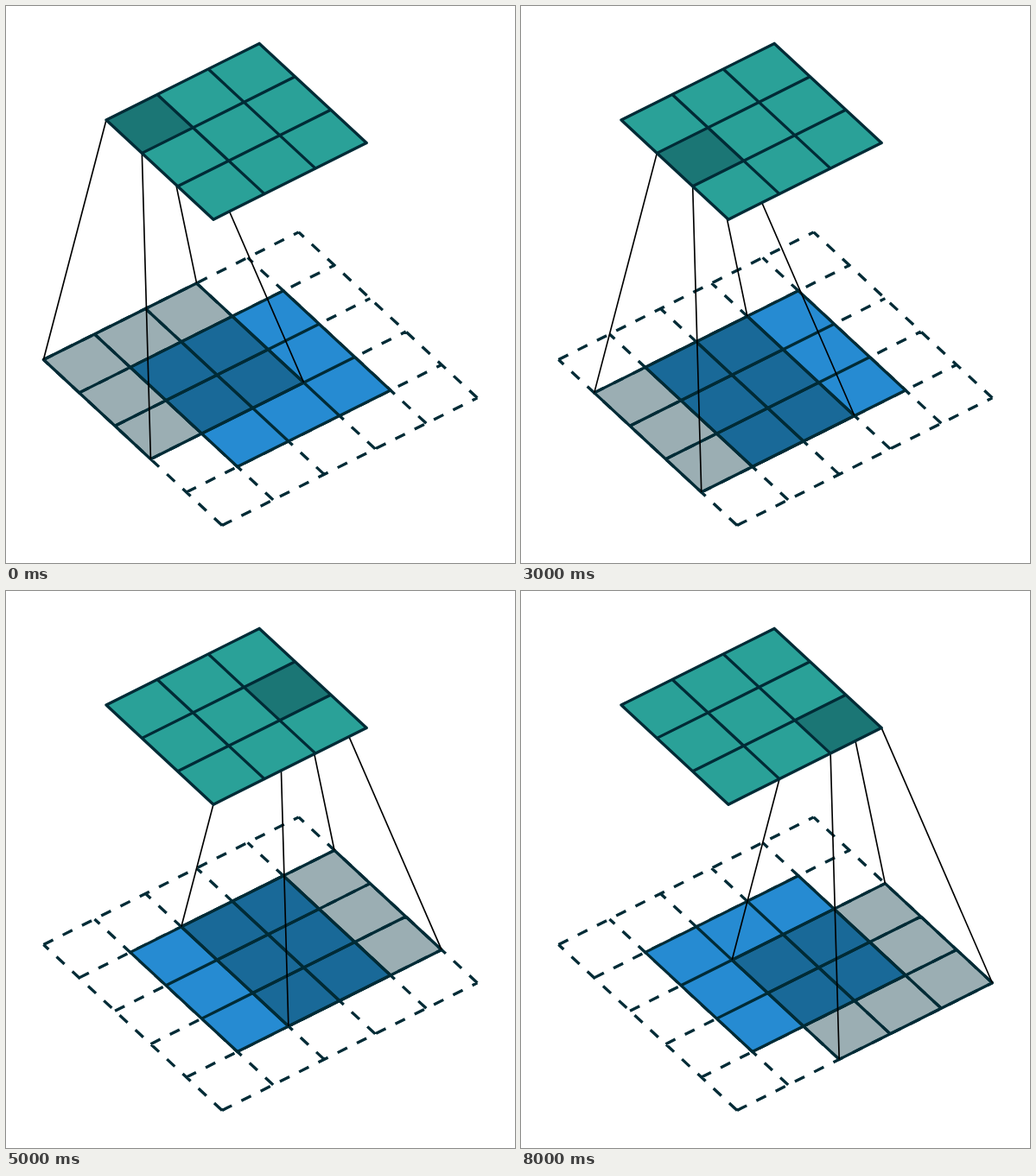
An HTML page that plays this animation: 589x645 px, repeating every 9 s.

```html
<!DOCTYPE html>
<html lang="en">
<head>
<meta charset="utf-8">
<style>
  html, body { margin: 0; width: 100%; height: 100%; overflow: hidden; background: #fff; }
  svg { display: block; width: 589px; height: 645px; }
  path { fill: none; }
  .grid { stroke: #002b36; stroke-width: 3.32; stroke-linecap: round; }
  .dashed { stroke-linecap: butt; stroke-dasharray: 12.45; }
  .shade { fill: #073642; fill-opacity: .4; }
  .ray { stroke: #000; stroke-width: 1.66; }
</style>
</head>
<body>
<svg id="stage" viewBox="0 0 589 645"></svg>
<script>
const STEP = 1000, UNIT = 59.055;
const INPUT = [43.4, 409.5], OUTPUT = [116, 132];
const stage = document.getElementById('stage');

// Slanted projection of grid column and row onto the stage
const point = ([x, y], col, row) =>
  [x + UNIT * (col + 0.7 * row), y + UNIT * (0.65 * row - 0.5 * col)].map(n => n.toFixed(2)).join(' ');

const line = (a, b) => `M${a}L${b}`;

function square(origin, col, row, size) {
  const corners = [[0, 0], [size, 0], [size, size], [0, size]];
  return 'M' + corners.map(([c, r]) => point(origin, col + c, row + r)).join('L') + 'Z';
}

function grid(origin, col, row, size) {
  let d = '';
  for (let i = 0; i <= size; i++) {
    d += line(point(origin, col, row + i), point(origin, col + size, row + i));
    d += line(point(origin, col + i, row + size), point(origin, col + i, row));
  }
  return d;
}

function rays(col, row) {
  return [[0, 0], [0, 1], [1, 0], [1, 1]].map(([c, r]) =>
    line(point(OUTPUT, col + c, row + r), point(INPUT, col + 3 * c, row + 3 * r))).join('');
}

function addPath(className, d = '', fill) {
  const path = document.createElementNS('http://www.w3.org/2000/svg', 'path');
  path.setAttribute('class', className);
  path.setAttribute('d', d);
  if (fill) path.style.fill = fill;
  return stage.appendChild(path);
}

addPath('grid dashed', grid(INPUT, 0, 0, 5));
addPath('', square(INPUT, 1, 1, 3), '#268bd2');
addPath('grid', grid(INPUT, 1, 1, 3));
const kernelShade = addPath('shade');
const kernelGrid = addPath('grid');
const projection = addPath('ray');
addPath('', square(OUTPUT, 0, 0, 3), '#2aa198');
const outputShade = addPath('shade');
addPath('grid', grid(OUTPUT, 0, 0, 3));

function render(time) {
  const index = Math.floor(time / STEP) % 9;
  const col = index % 3, row = Math.floor(index / 3);
  kernelShade.setAttribute('d', square(INPUT, col, row, 3));
  kernelGrid.setAttribute('d', grid(INPUT, col, row, 3));
  projection.setAttribute('d', rays(col, row));
  outputShade.setAttribute('d', square(OUTPUT, col, row, 1));
}

const start = performance.now();
function tick() {
  render(performance.now() - start);
  requestAnimationFrame(tick);
}
tick();
</script>
</body>
</html>
```
